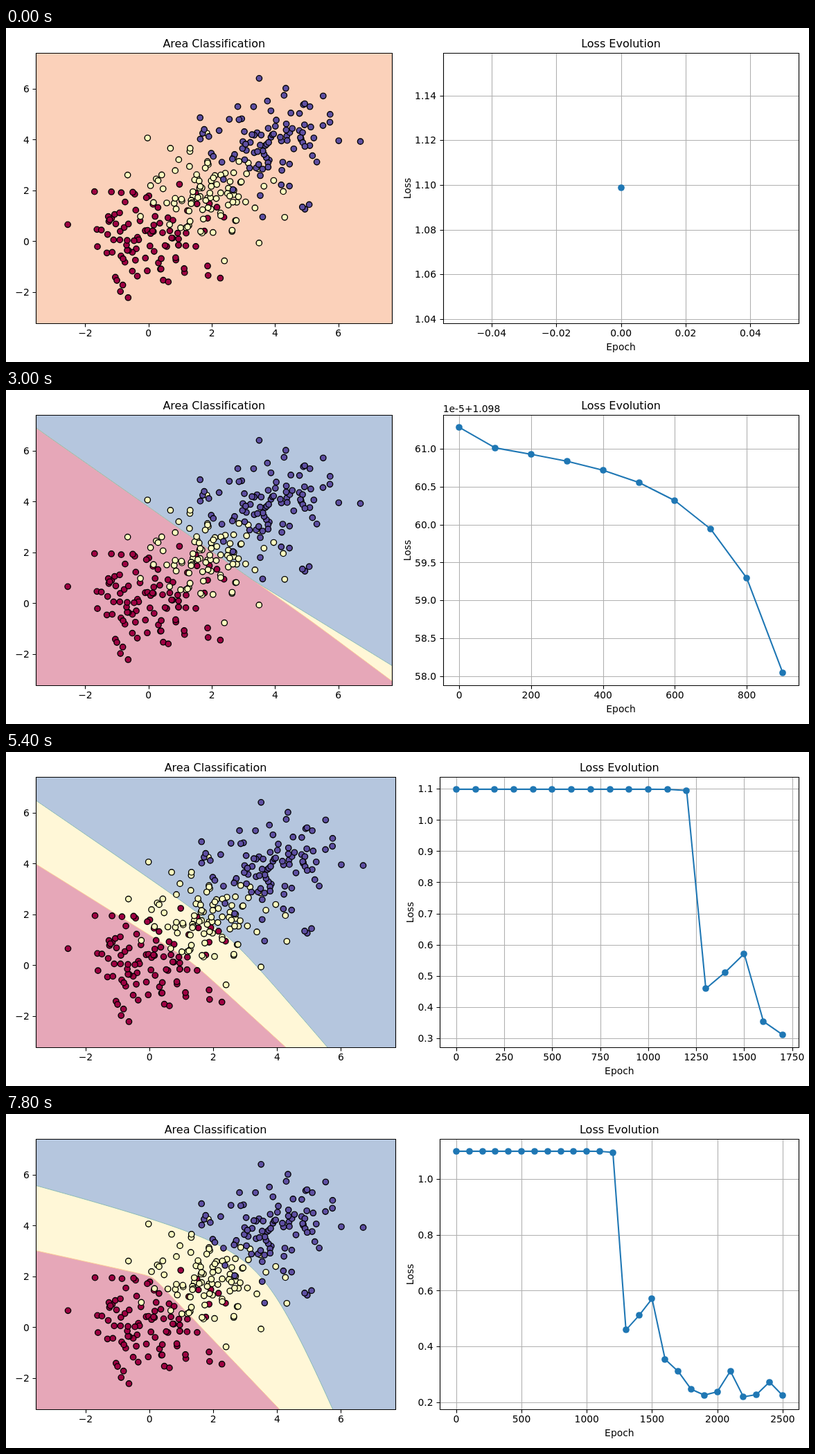
Recreate the animation shown at these times as an HTML page. Size 1159x483 px, loop 8 s.

```html
<!DOCTYPE html>
<html lang="en">
<head>
<meta charset="utf-8">
<title>Area Classification</title>
<style>
  html, body { margin: 0; width: 100%; height: 100%; overflow: hidden; background: #fff; }
  svg { display: block; width: 1159px; height: 483px; font: 13.889px "DejaVu Sans", sans-serif; font-variant-ligatures: none; }
  .title { font-size: 16px; }
  .thin { fill: none; stroke: #000; stroke-width: 1.11px; }
  .grid { fill: none; stroke: #b0b0b0; stroke-width: 1.11px; }
  .loss { fill: none; stroke: #1f77b4; stroke-width: 2.08px; stroke-linejoin: round; }
  .dot { fill: #1f77b4; }
  .sample { stroke: #000; stroke-width: 1.39px; }
  .edge { fill: none; stroke-width: 1px; }
</style>
</head>
<body>
<svg id="stage" viewBox="0 0 1159 483"></svg>
<script>
const stage = document.getElementById('stage');
const LEFT = 43.45, RIGHT = 1144.45, TOP = 36.1, BOTTOM = 426.7, EM = 13.889;
const STEP_MS = 300, LOOP_MS = 8000;
const CLASS_COLORS = ['#9e0142', '#ffffbf', '#5e4fa2'];

// Mersenne Twister with polar normal deviates
function normalSource(seed) {
  const mt = new Uint32Array(624);
  let index = 624, spare = null;
  mt[0] = seed;
  for (let i = 1; i < 624; i++)
    mt[i] = Math.imul(1812433253, mt[i - 1] ^ (mt[i - 1] >>> 30)) + i;
  function next() {
    if (index === 624) {
      for (let i = 0; i < 624; i++) {
        const y = (mt[i] & 0x80000000) | (mt[(i + 1) % 624] & 0x7fffffff);
        mt[i] = mt[(i + 397) % 624] ^ (y >>> 1) ^ (y & 1 ? 0x9908b0df : 0);
      }
      index = 0;
    }
    let y = mt[index++];
    y ^= y >>> 11;
    y ^= (y << 7) & 0x9d2c5680;
    y ^= (y << 15) & 0xefc60000;
    return (y ^ (y >>> 18)) >>> 0;
  }
  const uniform = () => {
    const a = next() >>> 5, b = next() >>> 6;
    return (a * 67108864 + b) / 9007199254740992;
  };
  return () => {
    if (spare !== null) { const v = spare; spare = null; return v; }
    let a, b, r;
    do {
      a = 2 * uniform() - 1;
      b = 2 * uniform() - 1;
      r = a * a + b * b;
    } while (r >= 1 || r === 0);
    const f = Math.sqrt(-2 * Math.log(r) / r);
    spare = f * a;
    return f * b;
  };
}

const normal = normalSource(0);
const samples = Array.from({ length: 300 }, (_, i) => {
  const group = Math.floor(i / 100);
  const x = normal() + 2 * group, y = normal() + 2 * group;
  return { x, y, group };
});
const limits = key => {
  const values = samples.map(s => s[key]);
  return [Math.min(...values) - 1, Math.max(...values) + 1];
};
const xLimits = limits('x'), yLimits = limits('y');

// A plateau that falls ever faster, then a sudden drop and a noisy descent
const plateau = n =>
  1.09861284 - 1e-6 * (427 / (12.63 - n) ** 2 - 2.68 * Math.exp(-1.8 * Math.sqrt(n)));
const descent = [1.0945, 0.459, 0.511, 0.571, 0.354, 0.311, 0.247,
  0.226, 0.238, 0.312, 0.22, 0.228, 0.273, 0.225];
const losses = [...Array.from({ length: 12 }, (_, n) => plateau(n)), ...descent];

// Each border is a rounded bend: x, y, slope before, slope after, radius
const PANE_WIDTH = 518;
const borders = [
  { at: 2, upper: [232, 191, 0.93, 0, 24], lower: [400, 307, 0.66, 1.25, 40] },
  { at: 5, upper: [235, 186, 0.7, 0.33, 20], lower: [450, 333, 0.665, 1.05, 20] },
  { at: 9, upper: [255, 201, 0.72, 0.61, 20], lower: [400, 298, 0.697, 0.74, 20] },
  { at: 14, upper: [259, 254, 0.882, 0.882, 20], lower: [259, 307, 0.887, 0.887, 20] },
  { at: 19, upper: [320, 203, 0.33, 1.7, 80], lower: [164, 201, 0.16, 0.97, 8] },
  { at: 25, upper: [335, 213, 0.26, 2.4, 60], lower: [168, 201, 0.22, 1.05, 6] },
];

function bend([px, py, before, after, radius], x) {
  const d = x - px;
  return py + (before + after) / 2 * d + (after - before) / 2 * (Math.hypot(d, radius) - radius);
}

function borderAt(n, side) {
  const index = Math.max(1, borders.findIndex(b => b.at >= n));
  const from = borders[index - 1], to = borders[index];
  const mix = Math.max(0, (n - from.at) / (to.at - from.at)) ** 2;
  return from[side].map((v, i) => v + (to[side][i] - v) * mix);
}

const snap = v => Math.round(v) + 0.5;
const fix = v => v.toFixed(2);
const scale = ([lo, hi], a, b) => v => a + (v - lo) / (hi - lo) * (b - a);
const text = (x, y, s, anchor = 'middle', extra = '') =>
  `<text x="${fix(x)}" y="${fix(y)}" text-anchor="${anchor}" ${extra}>${s}</text>`;
const circle = (x, y, r, extra) => `<circle cx="${fix(x)}" cy="${fix(y)}" r="${r}" ${extra}/>`;
const path = (d, extra) => `<path d="${d}" ${extra}/>`;
const trace = points => 'M' + points.map(p => p.map(fix).join(' ')).join('L');
const box = (x0, x1) => `M${snap(x0)} ${snap(TOP)}H${snap(x1)}V${snap(BOTTOM)}H${snap(x0)}Z`;
const textWidth = s => EM * [...s].reduce((w, c) => w + (c === '.' ? 0.318 : c === '−' ? 0.838 : 0.636), 0);

// Round tick values with labels; a large common part moves into the note
function ticksFor([lo, hi]) {
  const raw = (hi - lo) / 9, base = 10 ** Math.floor(Math.log10(raw));
  const step = base * [1, 2, 2.5, 5, 10].find(m => m * base >= raw * (1 - 1e-9));
  const values = [];
  for (let i = Math.ceil(lo / step); i <= Math.floor(hi / step); i++) values.push(i * step);
  const first = values[0], last = values[values.length - 1];
  let offset = 0, exponent = 0, note = '';
  if (first > 0) {
    let order = Math.ceil(Math.log10(last));
    const lead = v => Math.floor(v / 10 ** order + 1e-9);
    while (lead(first) === lead(last)) order--;
    order++;
    if (lead(last) >= 1000) {
      offset = lead(last) * 10 ** order;
      exponent = Math.floor(Math.log10(hi - lo));
      note = `1e${exponent}+${offset.toFixed(-order)}`;
    }
  }
  const unit = 10 ** exponent;
  let digits = 0;
  while (Math.abs(step / unit * 10 ** digits - Math.round(step / unit * 10 ** digits)) > 1e-6) digits++;
  const label = v => {
    const s = Math.abs((v - offset) / unit).toFixed(digits);
    return ((v - offset) / unit < 0 && Number(s) ? '−' : '') + s;
  };
  return { note, items: values.map(v => ({ v, label: label(v) })) };
}

function frame(x0, x1, xTicks, yTicks, sx, sy, title) {
  let marks = '', labels = '';
  for (const { v, label } of xTicks.items) {
    marks += `M${snap(sx(v))} ${snap(BOTTOM)}v5`;
    labels += text(sx(v), 446.3, label);
  }
  for (const { v, label } of yTicks.items) {
    marks += `M${snap(x0)} ${snap(sy(v))}h-5`;
    labels += text(x0 - 9.7, sy(v) + 5.2, label, 'end');
  }
  return path(box(x0, x1) + marks, 'class="thin"') + labels +
    text((x0 + x1) / 2, 28, title, 'middle', 'class="title"');
}

function areaPlot(n, x1, trained) {
  const sx = scale(xLimits, LEFT, x1), sy = scale(yLimits, BOTTOM, TOP);
  const fill = (d, color) => path(d, `fill="${color}"`);
  const pane = box(LEFT, x1);
  let out = `<clipPath id="pane">${path(pane, '')}</clipPath><g clip-path="url(#pane)">`;
  if (trained) {
    const high = borderAt(n, 'upper'), low = borderAt(n, 'lower');
    const line = height => trace(Array.from({ length: 131 }, (_, i) => {
      const x = i / 130 * PANE_WIDTH;
      return [LEFT + x * (x1 - LEFT) / PANE_WIDTH, TOP + height(x)];
    }));
    const lower = line(x => bend(low, x));
    const upper = line(x => Math.min(bend(high, x), bend(low, x)));
    const close = `H${x1 + 2}V900H${LEFT}Z`;
    out += fill(pane, '#b5c6de') + fill(upper + close, '#fff7d7') + fill(lower + close, '#e6a7b8') +
      path(lower, 'class="edge" stroke="#fbca98"') + path(upper, 'class="edge" stroke="#8abab6"');
  } else {
    out += fill(pane, '#fbd1ba');
  }
  out += '</g>';
  for (const { x, y, group } of samples)
    out += circle(sx(x), sy(y), 4.17, `class="sample" fill="${CLASS_COLORS[group]}"`);
  return out + frame(LEFT, x1, ticksFor(xLimits), ticksFor(yLimits), sx, sy, 'Area Classification');
}

function padded(lo, hi) {
  if (lo === hi) {
    const grow = Math.abs(lo) * 0.05 || 0.05;
    lo -= grow;
    hi += grow;
  }
  const margin = (hi - lo) * 0.05;
  return [lo - margin, hi + margin];
}

function lossPlot(shown, x0, xRange, yRange, yTicks, labelWidth) {
  const xTicks = ticksFor(xRange);
  const sx = scale(xRange, x0, RIGHT), sy = scale(yRange, BOTTOM, TOP);
  const grid = xTicks.items.map(t => `M${snap(sx(t.v))} ${TOP}V${BOTTOM}`).join('') +
    yTicks.items.map(t => `M${snap(x0)} ${snap(sy(t.v))}H${RIGHT}`).join('');
  const points = shown.map((v, i) => [sx(i * 100), sy(v)]);
  const labelX = x0 - 16.1 - labelWidth;
  return path(grid, 'class="grid"') + path(trace(points), 'class="loss"') +
    points.map(([x, y]) => circle(Math.round(x), Math.round(y), 4.86, 'class="dot"')).join('') +
    frame(x0, RIGHT, xTicks, yTicks, sx, sy, 'Loss Evolution') +
    text((x0 + RIGHT) / 2, 466, 'Epoch') +
    text(labelX, 232, 'Loss', 'middle', `transform="rotate(-90 ${fix(labelX)} 232)"`) +
    text(x0, 32, yTicks.note, 'start');
}

function draw(tick) {
  const n = Math.max(0, tick - 1);
  const shown = losses.slice(0, n + 1);
  const xRange = padded(0, n * 100), yRange = padded(Math.min(...shown), Math.max(...shown));
  const yTicks = ticksFor(yRange);
  const labelWidth = Math.max(...yTicks.items.map(t => textWidth(t.label)));
  const gap = labelWidth + 42.6, width = (RIGHT - LEFT - gap) / 2;
  stage.innerHTML = areaPlot(n, LEFT + width, tick > 0) +
    lossPlot(shown, RIGHT - width, xRange, yRange, yTicks, labelWidth);
}

const start = performance.now();
let current = -1;
function update() {
  const tick = Math.floor(((performance.now() - start) % LOOP_MS) / STEP_MS);
  if (tick !== current) draw(current = tick);
  requestAnimationFrame(update);
}
update();
</script>
</body>
</html>
```
